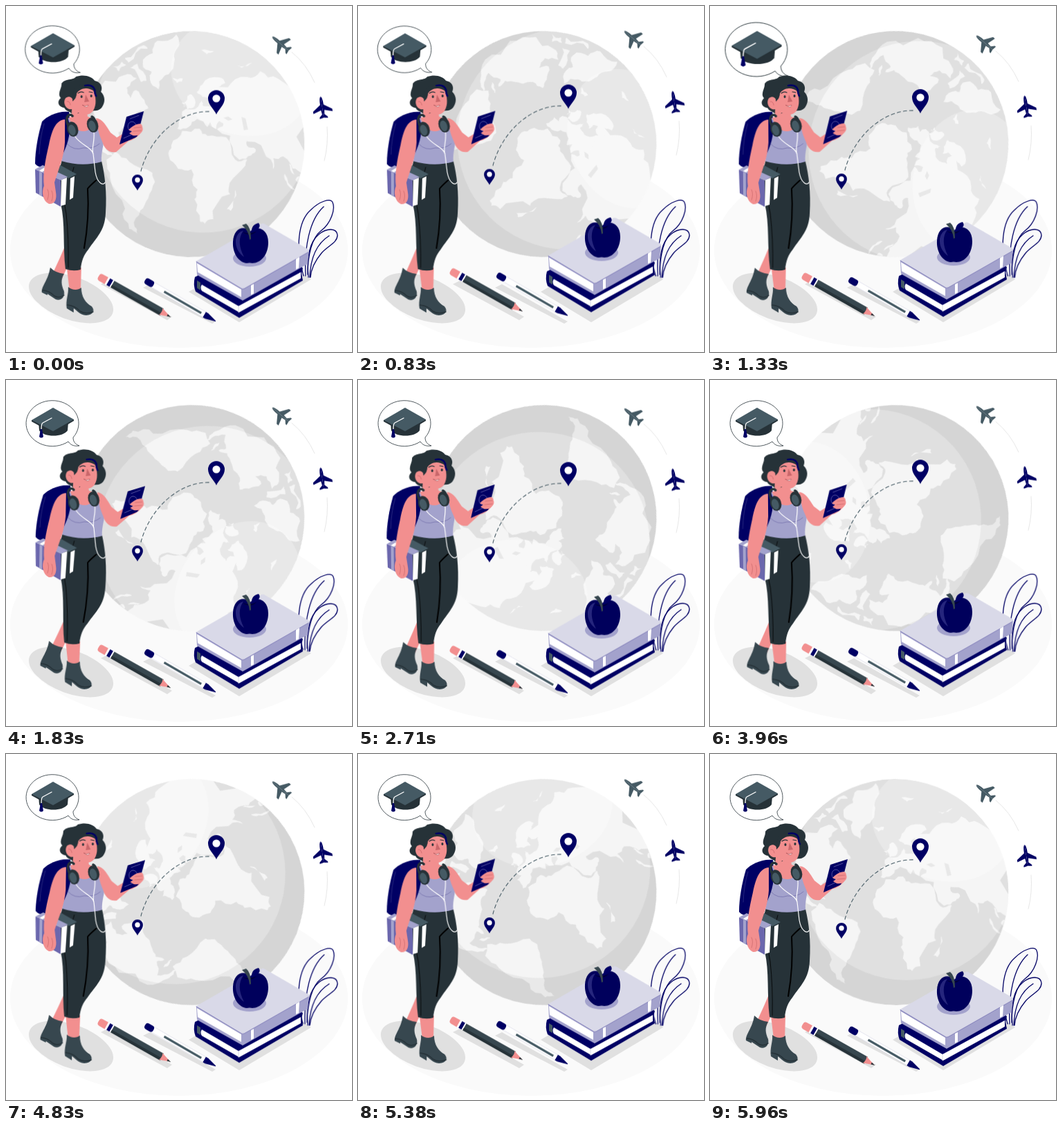
An HTML page for the animation above (6000 ms loop, 500 px wide and 500 px high).

```html
<!DOCTYPE html>
<html lang="en">
<head>
<meta charset="utf-8">
<title>Studying abroad</title>
<style>
  html, body { margin: 0; width: 100%; height: 100%; overflow: hidden; background: #fff; }
  svg { display: block; width: 100%; height: 100%; }
  .spin, .float, .sway, .beat { animation: 1.5s linear -30ms infinite; }
  .spin { animation-name: spin; animation-duration: 6s; transform-origin: 268px 199.5px; }
  .float { animation-name: float; }
  .sway { animation-name: sway; transform-origin: 120px 274px; }
  .plant { transform-origin: 451px 336px; }
  .beat { animation-name: beat; animation-duration: 3s; transform-origin: 68px 62px; }
  @keyframes spin { to { transform: rotate(360deg); } }
  @keyframes float { 50% { transform: translateY(-10px); } }
  @keyframes sway { 25% { transform: rotate(1deg); } 75% { transform: rotate(-1deg); } }
  @keyframes beat {
    0%, 30%, 40%, 60%, 100% { transform: scale(1); }
    10%, 50% { transform: scale(1.34); }
  }
  .navy { fill: #000064; }
  .ink { fill: #263238; }
  .slate { fill: #37474f; }
  .steel { fill: #455a64; }
  .skin { fill: #f28f8f; }
  .lilac { fill: #a3a2cc; }
  .pale { fill: #d9d9e8; }
  .shade { fill: #e0e0e0; }
  .white { fill: #fff; }
  .land { fill: #f5f5f5; }
  .line { fill: none; stroke-linecap: round; stroke-linejoin: round; }
</style>
</head>
<body>
<svg viewBox="0 0 500 500">
  <defs>
    <clipPath id="disc"><circle cx="268" cy="199.5" r="163.5"/></clipPath>
    <path id="wing" d="M0-16Q2.500-15 2.500-4L14 4V7.500L2.500 4 1.700 10 6 14V16L0 15Z"/>
    <g id="plane"><use href="#wing"/><use href="#wing" transform="scale(-1 1)"/></g>
    <g id="pin">
      <path class="navy" d="M0 0C-3-7-12-14-12-23A12 12 0 0 1 12-23C12-14 3-7 0 0Z"/>
      <circle class="white" cy="-23" r="5.6"/>
    </g>
    <g id="cup">
      <ellipse class="ink" rx="8" ry="11"/>
      <ellipse class="steel" cx="-1" cy="1" rx="5" ry="8"/>
    </g>
  </defs>

  <ellipse cx="250" cy="353" rx="244" ry="141" fill="#fafafa"/>

  <g class="spin" clip-path="url(#disc)">
    <circle cx="268" cy="199.5" r="163.5" fill="#e0e0e0"/>
    <!-- Americas -->
    <polygon class="land" points="140,112 168,103 186,107 172,121 178,136 185,124 198,138 204,150 188,156 170,178 162,186 163,199 156,190 138,198 143,207 156,221 140,215 120,190 121,145"/>
    <polygon class="land" points="146,226 158,214 179,228 213,243 217,256 208,280 197,298 190,322 194,331 182,325 175,296 152,252"/>
    <polygon class="land" points="152,202 167,209 160,208"/>
    <polygon class="land" points="150,92 163,84 170,88 160,98"/>
    <polygon class="land" points="168,78 194,59 200,64 173,85"/>
    <polygon class="land" points="176,92 186,86 200,110 192,112"/>
    <!-- Northern islands -->
    <polygon class="land" points="214,52 241,42 243,62 240,78 235,95 226,102 218,122 205,108 207,97 194,86 208,70"/>
    <polygon class="land" points="238,105 252,105 251,110 244,112"/>
    <polygon class="land" points="278,63 296,64 286,69"/>
    <polygon class="land" points="331,84 352,79 337,87"/>
    <polygon class="land" points="260,130 266,128 271,144 260,150"/>
    <polygon class="land" points="252,140 258,139 256,147"/>
    <!-- Eurasia -->
    <polygon class="land" points="247,178 247,163 256,162 253,153 276,145 281,136 283,144 298,143 309,129 340,110 345,165 328,167 307,165 303,177 294,167 290,174 275,163 263,175"/>
    <polygon class="land" points="282,131 273,124 281,113 305,102 314,110 304,116 340,105 340,125 309,131 298,127 297,117 291,126 291,134"/>
    <polygon class="land" points="317,117 345,100 364,91 390,101 440,130 440,238 423,233 410,223 418,239 401,213 387,216 387,232 373,207 341,190 304,177 316,163"/>
    <polygon class="land" points="309,178 345,185 348,199 361,204 355,213 338,220 324,182"/>
    <!-- Africa and the south-east -->
    <polygon class="land" points="254,181 279,177 291,187 318,188 332,220 349,219 347,228 325,254 326,270 303,307 291,314 284,311 275,279 279,265 269,236 250,236 236,218 239,202"/>
    <polygon class="land" points="333,264 335,272 328,294 322,292"/>
    <polygon class="land" points="404,238 420,261 407,249"/>
    <polygon class="land" points="420,246 428,240 426,256"/>
    <path class="shade" d="M339 158L345 160 349 176 343 177ZM313 160L320 158 326 162 320 164Z"/>
    <path fill="#000" fill-opacity=".05" fill-rule="evenodd" d="M104 199.500a164 164 0 1 1 328 0a164 164 0 1 1-328 0ZM124 167a160 160 0 1 1 320 0a160 160 0 1 1-320 0Z"/>
    <ellipse cx="336" cy="101" rx="103" ry="82" transform="rotate(18 336 101)" fill="#fff" fill-opacity=".25"/>
  </g>

  <g class="float">
    <path class="line" d="M195 239C207 192 250 150 297 153" stroke="#455a64" stroke-width="1.1" stroke-dasharray="5 4"/>
    <use href="#pin" x="304" y="157"/>
    <use href="#pin" transform="translate(190 267) scale(.66)"/>
    <path class="line" stroke="#e0e0e0" stroke-width=".8" d="M413 67Q434 84 446 111M464 175Q466 200 460 224"/>
    <use href="#plane" class="steel" transform="translate(397 55) rotate(-50)"/>
    <use href="#plane" class="navy" transform="translate(457 147) rotate(-9)"/>
  </g>

  <g class="beat">
    <path d="M97 83A38 33 0 1 0 90 89C94 95 100 96 106 95 100 93 97 89 97 83Z" fill="#fff" stroke="#263238" stroke-width=".8"/>
    <path class="ink" d="M47 60L48 73C55 83 82 83 89 73L90 61Z"/>
    <path class="ink" d="M37 58V60L68 77 98 59V57Z"/>
    <path class="steel" d="M37 58L68 40 98 57 68 74Z"/>
    <path class="line" d="M66 55L53 62Q51 63 51 72" stroke="#fff" stroke-width="1.3"/>
    <path class="navy" d="M50 71H52L54 82Q51 85 48 82Z"/>
  </g>

  <!-- Ground shadows -->
  <g class="shade">
    <ellipse cx="94" cy="422" rx="64" ry="31" transform="rotate(20 94 422)"/>
    <path d="M137 402L147 397 240 449 233 454Z"/>
    <path d="M198 407L208 402 303 456 298 459Z"/>
    <path d="M264 413L372 350 441 395 337 457Z"/>
  </g>

  <g class="sway plant line" stroke="#000064" stroke-width="1.3">
    <path d="M430 390C418 350 422 311 440 295 453 282 469 277 472 284 476 293 470 314 455 325 442 335 436 360 436 388M433 390C431 350 438 309 459 290"/>
    <path d="M437 392C434 361 439 341 452 330 464 320 478 321 479 331 479 342 466 346 456 357 446 369 441 379 440 392M439 392C440 364 448 344 467 332"/>
  </g>

  <g class="float">
    <!-- Pencil -->
    <g transform="translate(135 391) rotate(29.5)">
      <rect class="skin" x="-1" y="-5" width="16" height="11" rx="4"/>
      <rect class="white" x="12" y="-5" width="10" height="11"/>
      <rect class="navy" x="15" y="-5" width="5" height="11"/>
      <rect class="slate" x="22" y="-5" width="82" height="11"/>
      <rect class="ink" x="22" y="2" width="82" height="4"/>
      <path class="skin" d="M102-5L118 .5 102 6Q105 0 102-5Z"/>
      <path class="ink" d="M113-1L119 .5 113 2Z"/>
    </g>
    <!-- Pen -->
    <g transform="translate(202 397) rotate(30)">
      <rect class="white" x="10" y="-4" width="90" height="8.5" stroke="#d9d9e8" stroke-width=".6"/>
      <rect class="navy" x="-1" y="-4.5" width="14" height="9.5" rx="4"/>
      <rect class="steel" x="31" y="-1" width="62" height="3.3"/>
      <path class="navy" d="M98-4H102L117 0V1L102 5H98Z"/>
    </g>

    <!-- Lower book -->
    <path class="navy" d="M273 392L368 345 429 379 427 387 429 397 337 451 274 413Q270 403 273 392Z"/>
    <path class="white" d="M283 403L336 434 426 385V394L337 443 283 412Q280 407 283 403Z"/>
    <path class="line" d="M336 434V443" stroke="#d9d9e8"/>
    <path class="steel" d="M276 397L281 400V411L276 408Z"/>
    <!-- Upper book -->
    <path class="lilac" d="M275 369L342 407 438 353 436 373 342 426 276 389Z"/>
    <path class="white" d="M276 372L340 410V421L277 385Z"/>
    <path class="pale" d="M275 369L369 315Q371 314 373 315L437 352Q439 354 437 356L344 409Q341 410 339 408Z"/>
    <path class="line" d="M275 370L339 408Q341 410 344 409L437 356" stroke="#8380bb"/>
    <path class="white" d="M354 404L358 402V416L354 418ZM419 366L424 363 423 379 419 381Z"/>

    <!-- Apple -->
    <ellipse class="lilac" cx="352" cy="365" rx="24" ry="12"/>
    <path d="M353 326C361 317 379 321 379 342 379 360 368 372 356 372Q352 371 348 372C336 371 327 357 328 341 329 322 343 316 353 326Z" fill="#00005c"/>
    <path d="M332 338Q334 327 343 325 332 340 344 363 331 354 332 338Z" fill="#26267d"/>
    <path d="M342 327Q352 331 362 326 353 335 342 327Z" fill="#000038"/>
    <path class="slate" d="M341 317L347 315Q354 320 354 337L352 338Q351 325 341 317Z"/>
    <path class="navy" d="M355 328Q354 316 365 314 371 321 355 328Z"/>
  </g>

  <g class="sway">
    <!-- Backpack -->
    <path class="navy" d="M91 153C76 151 59 159 52 167 46 187 42 210 42 228 47 235 62 236 74 233L94 192Z"/>
    <path class="line" d="M55 170Q49 190 48 214" stroke="#26267d"/>

    <!-- Legs and boots -->
    <path class="skin" d="M84 350L93 368 81 394 67 388 78 364ZM88 378H109L108 412H92Z"/>
    <path class="slate" d="M64 378Q72 386 84 387C79 396 80 403 84 412 86 421 79 427 72 424L60 416V418L52 414C51 405 61 397 64 378Z"/>
    <path class="slate" d="M90 406C96 411 104 411 109 407 109 420 115 429 124 434 129 440 127 446 116 447 106 446 103 440 98 437V443L88 437C86 425 91 416 90 406Z"/>
    <path class="line" d="M89 432Q100 433 107 441 115 446 126 442M53 411Q62 411 70 419 77 423 84 418" stroke="#263238" stroke-width="1.5"/>
    <path class="ink" d="M81 222C75 242 75 264 79 285 86 315 82 347 86 380Q97 384 108 381C109 368 113 359 119 352 131 334 143 325 144 299 146 270 143 245 138 224Z"/>
    <path class="line" d="M130 252Q120 261 118 264C120 296 118 322 113 350" stroke="#000" stroke-width="2"/>
    <path class="line" d="M85 240C81 260 83 280 87 300Q91 336 90 378M98 233Q96 245 87 251" stroke="#000" stroke-width=".8"/>

    <!-- Top -->
    <path class="skin" d="M94 145H115L118 160 136 166 132 190 88 188 84 164 95 160Z"/>
    <path class="lilac" d="M85 164L91 162Q98 182 113 181 125 180 128 164L134 167Q134 178 141 189C142 202 137 210 138 225Q110 233 80 224C84 209 82 195 80 180Z"/>
    <path class="line" d="M88 199Q98 210 112 205 126 207 135 199" stroke="#807db4"/>
    <path class="navy" d="M83 164L89 161Q98 185 79 220L75 218Q84 194 83 164Z"/>

    <!-- Arm with passport -->
    <path class="skin" d="M130 162C140 163 145 174 151 183L160 190 178 179C182 170 193 169 196 173Q200 179 194 184 187 193 177 195L159 211C149 213 142 206 139 196 133 183 132 174 130 162Z"/>
    <path class="navy" d="M174 160L199 152 190 187Q189 189 187 190L164 200Z"/>
    <g class="line" stroke="#6764aa" stroke-width=".8">
      <ellipse cx="182" cy="174" rx="6" ry="7"/>
      <path d="M179 163L192 158M170 191L181 186"/>
    </g>
    <path class="skin" d="M180 176Q187 170 194 170 199 173 195 177 199 180 194 184 191 188 183 187L178 184 182 181 177 179Z"/>
    <path class="line" d="M185 176L195 175M184 181L195 180" stroke="#c9676b" stroke-width=".7"/>

    <!-- Carried books -->
    <path class="ink" d="M58 231L102 243 100 278 88 283Z"/>
    <path class="white" d="M93 249L99 246 97 277 92 280Z"/>
    <path class="steel" d="M58 231L71 226 102 243 90 249Z"/>
    <path class="white" d="M64 231L70 228 74 230 68 234ZM80 251L88 248 86 287 79 289Z"/>
    <path d="M42 236L79 252V290L43 270Z" fill="#6b67ad"/>
    <path class="lilac" d="M42 236L53 230 89 247 79 252ZM48 239L52 241V275L48 273Z"/>
    <path class="white" d="M48 238L58 232 62 234 52 240Z"/>

    <!-- Near arm -->
    <path class="skin" d="M85 164C71 165 66 181 62 200 56 225 53 245 55 260 51 268 53 282 62 286 70 287 74 280 72 269L70 255C76 236 84 217 85 197Z"/>
    <path class="line" d="M60 265Q63 271 60 280M66 267Q69 274 66 282" stroke="#c9676b" stroke-width=".7"/>

    <!-- Head -->
    <path class="ink" d="M79 133C73 126 81 119 80 112 86 104 97 108 101 102 113 98 124 102 128 108 137 110 140 117 137 124 145 132 142 142 138 147 132 154 123 150 118 152L96 157C91 151 87 153 84 147 75 146 73 138 79 133Z"/>
    <path class="skin" d="M99 122C106 114 121 115 126 122 130 131 131 143 126 151 121 159 110 158 104 154L100 164H94L95 149C87 151 81 140 86 133 91 129 96 132 97 137Z"/>
    <path class="ink" d="M96 138Q94 118 109 113L126 117 127 123C117 116 107 119 102 126Q102 133 96 138Z"/>
    <path class="line" d="M114 115Q125 113 128 121 128 127 130 130" stroke="#000064" stroke-width="2.5"/>
    <path d="M115 128L120 138 113 139Z" fill="#c9676b"/>
    <ellipse class="ink" cx="109" cy="131" rx="1.5" ry="2"/>
    <ellipse class="ink" cx="123" cy="130" rx="1.5" ry="2"/>
    <path class="line" d="M104 126Q108 123 112 125M120 124L125 125" stroke="#263238" stroke-width="1.2"/>
    <path class="white" d="M110 143Q114 146 119 143 117 149 110 143Z" stroke="#a94d52" stroke-width=".6"/>
    <path class="line" d="M88 138Q92 137 93 143" stroke="#c9676b" stroke-width=".8"/>

    <!-- Headphones -->
    <path class="line" d="M91 176C83 160 91 154 96 159M124 160Q127 161 129 167" stroke="#263238" stroke-width="3.5"/>
    <use href="#cup" transform="translate(96 178) rotate(-18)"/>
    <use href="#cup" transform="translate(125 172) rotate(-18)"/>
    <path class="line" d="M100 189C108 201 123 203 126 214L129 240C132 257 141 260 143 255M127 183C128 198 123 206 126 214" stroke="#fff" stroke-width="1.2"/>
  </g>
</svg>
<script>
  // Roughen the coastlines by seeded midpoint displacement.
  let seed = 7;
  const random = () => (seed = seed * 16807 % 2147483647) / 2147483647;

  function roughen(points) {
    return points.flatMap(([x, y], i) => {
      const [nx, ny] = points[(i + 1) % points.length];
      const push = (random() - 0.5) * 0.4;
      return [[x, y], [(x + nx) / 2 + (ny - y) * push, (y + ny) / 2 - (nx - x) * push]];
    });
  }

  for (const land of document.querySelectorAll('.land')) {
    const corners = land.getAttribute('points').split(' ').map(p => p.split(',').map(Number));
    land.setAttribute('points', roughen(roughen(corners)).join(' '));
  }
</script>
</body>
</html>
```
